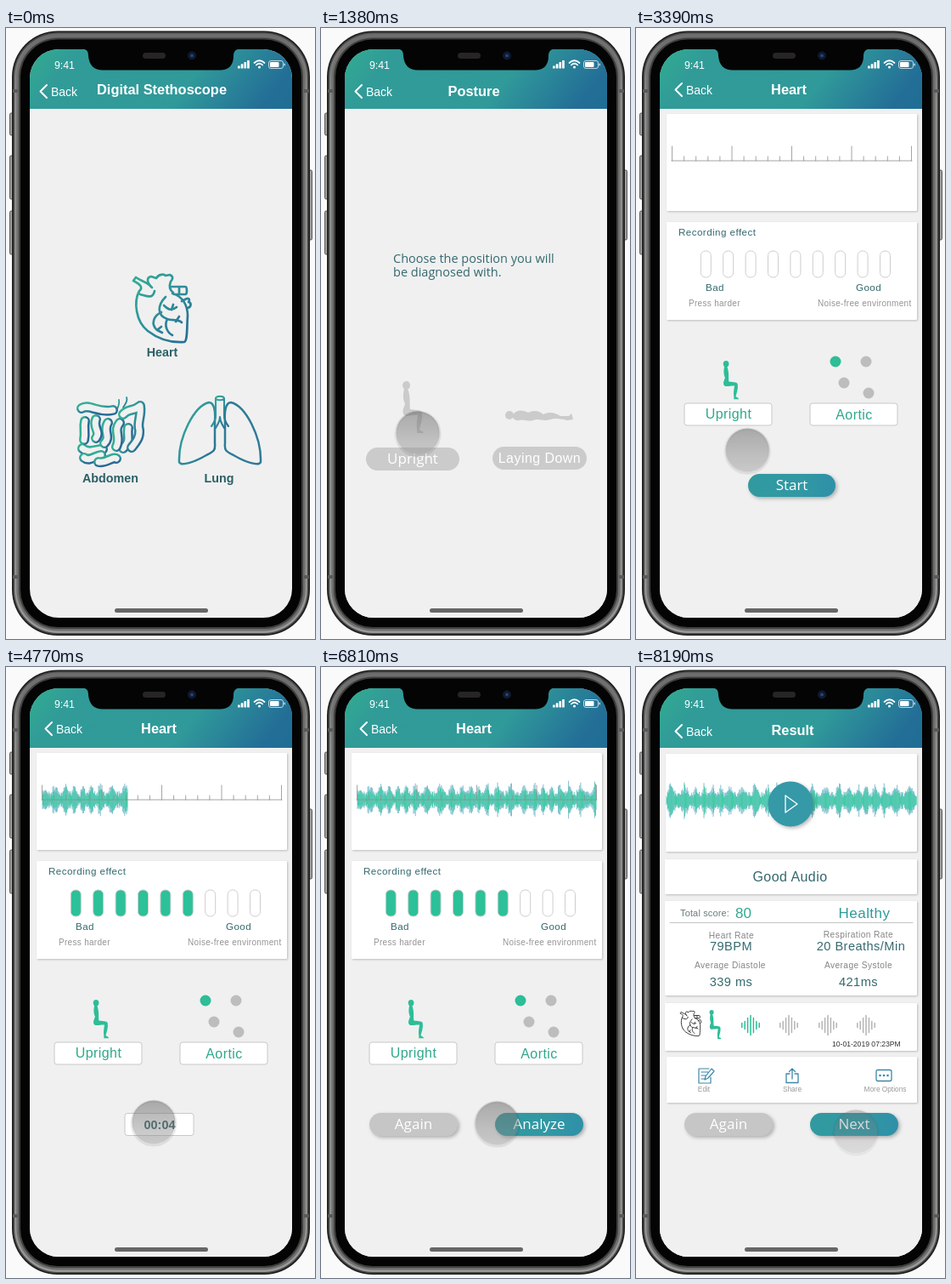
Recreate the animation shown at these times as an HTML page. Size 364 by 718 pixels, loop 8.22 s.

```html
<!DOCTYPE html>
<html lang="en">
<head>
<meta charset="utf-8">
<title>Stethoscope app walkthrough</title>
<style>
html, body { margin: 0; width: 100%; height: 100%; overflow: hidden; background: #fafafa; }
svg { display: block; }
text { font-family: "Open Sans", "Noto Sans", sans-serif; }
.ui { font-family: "Liberation Sans", Arial, sans-serif; }
.line { fill: none; stroke-linecap: round; stroke-linejoin: round; }
.soft { filter: drop-shadow(2px 2px 2px rgba(0, 0, 0, .28)); }
.card { filter: drop-shadow(1px 1px 1px rgba(0, 0, 0, .22)); }
.anim { animation: 8220ms linear infinite; }
.posture { animation-name: posture; }
.position { animation-name: position; }
.record { animation-name: record; }
.result { animation-name: result; }
.pickUpright { animation-name: pickUpright; }
.pickAortic { animation-name: pickAortic; }
.start { animation-name: start; }
.timer { animation-name: timer; }
.done { animation-name: done; }
.tick { animation-name: tick; }
.wipe, .level { transform-box: fill-box; transform-origin: 100% 0; }
.wipe { animation-name: wipe; }
.level { animation-name: level; animation-timing-function: step-end; }
.move { animation-name: move; }
.show { animation-name: show; }

@keyframes posture { 0%, 10.2% { opacity: 0 } 12.8%, 100% { opacity: 1 } }
@keyframes position { 0%, 22.5% { opacity: 0 } 25.2%, 100% { opacity: 1 } }
@keyframes record { 0%, 35.7% { opacity: 0 } 38.3%, 100% { opacity: 1 } }
@keyframes result { 0%, 90.4% { opacity: 0 } 94%, 100% { opacity: 1 } }
@keyframes pickUpright { 0%, 19.2% { opacity: 0 } 20.44%, 100% { opacity: 1 } }
@keyframes pickAortic { 0%, 32.6% { opacity: 0 } 33.2%, 100% { opacity: 1 } }
@keyframes start { 0%, 46.3% { opacity: 1 } 47.4%, 100% { opacity: 0 } }
@keyframes timer { 0%, 46.3% { opacity: 0 } 47.4%, 77.4% { opacity: 1 } 78.8%, 100% { opacity: 0 } }
@keyframes done { 0%, 77.4% { opacity: 0 } 78.8%, 100% { opacity: 1 } }
@keyframes tick {
  0% { transform: none }
  47.45% { transform: none; animation-timing-function: steps(12) }
  77%, 100% { transform: translateY(-324px) }
}
@keyframes wipe { 0%, 47.45% { transform: none } 77%, 100% { transform: scaleX(0) } }
@keyframes level {
  0% { transform: none }
  47.5% { transform: scaleX(.8889) }
  48.6% { transform: scaleX(.6667) }
  49.8% { transform: scaleX(.4444) }
  52% { transform: scaleX(.2222) }
  54.5% { transform: scaleX(.4444) }
  57% { transform: scaleX(.3333) }
  60% { transform: scaleX(.5556) }
  63% { transform: scaleX(.2222) }
  66% { transform: scaleX(.4444) }
  69% { transform: scaleX(.1111) }
  72% { transform: scaleX(.4444) }
  75%, 100% { transform: scaleX(.3333) }
}
@keyframes move {
  0% { transform: translate(300px, 508px) }
  1.82% { transform: translate(300px, 508px); animation-timing-function: ease-in-out }
  7.66% { transform: translate(193px, 355px) }
  14.6% { transform: translate(193px, 355px); animation-timing-function: cubic-bezier(.215, .61, .355, 1) }
  18.98% { transform: translate(103px, 493px) }
  25.5% { transform: translate(103px, 493px); animation-timing-function: ease-in }
  27.37% { transform: translate(116px, 459px); animation-timing-function: ease-out }
  31.8%, 38.9% { transform: translate(118px, 437px); animation-timing-function: ease-in }
  41.24% { transform: translate(131px, 496px); animation-timing-function: ease-out }
  44.89% { transform: translate(174px, 535px) }
  80.29% { transform: translate(174px, 535px); animation-timing-function: ease-in-out }
  86.13%, 93% { transform: translate(258px, 538px); animation-timing-function: ease-in-out }
  98%, 100% { transform: translate(259px, 546px) }
}
@keyframes show { 0%, 1.82% { opacity: 0 } 4%, 95% { opacity: 1 } 99.6%, 100% { opacity: .55 } }
</style>
</head>
<body>
<svg id="stage" width="364" height="718" viewBox="0 0 364 718"></svg>
<script>
const INK = '#34696f', TEAL = '#2f9a9b', GREEN = '#2fa88c', GRAY = '#cbcbcb', PAPER = '#f0f0f0';
const BOLD = 'class="ui" font-weight="700"', WIDE = 'class="ui" letter-spacing=".45"';

const text = (x, y, s, size, fill = INK, extra = '') =>
  `<text x="${x}" y="${y}" font-size="${size}" fill="${fill}" ${extra}>${s}</text>`;
const mid = (x, y, s, size, fill, extra = '') =>
  text(x, y, s, size, fill, 'text-anchor="middle" ' + extra);
const rect = (x, y, w, h, r, fill, extra = '') =>
  `<rect x="${x}" y="${y}" width="${w}" height="${h}" rx="${r}" fill="${fill}" ${extra}/>`;
const dot = (x, y, r, fill) => `<circle cx="${x}" cy="${y}" r="${r}" fill="${fill}"/>`;
const dots = (list, r, fill) => list.map(([x, y]) => dot(x, y, r, fill)).join('');
const line = (d, stroke, w = 1) =>
  `<path class="line" d="${d}" stroke="${stroke}" stroke-width="${w}"/>`;
const card = (x, y, w, h) => rect(x, y, w, h, 1, '#fff', 'class="card"');
const tag = (x, y, s, fill = GRAY, w = 104) =>
  rect(x, y, w, 27, 13.5, fill) + mid(x + w / 2, y + 18.5, s, 16, '#fff', WIDE);
const button = (x, y, s, fill = 'url(#btn)', w = 104, cls = 'soft') =>
  rect(x, y, w, 27, 13.5, fill, `class="${cls}"`) + mid(x + w / 2, y + 18.5, s, 17, '#fff');
const anim = (name, body) => `<g class="anim ${name}">${body}</g>`;
const repeat = (n, f) => Array.from({ length: n }, (_, i) => f(i)).join('');

function screen(title, tx, ty, bx, by, body) {
  return rect(28, 25, 309, 668, 0, PAPER) + body +
    rect(28, 25, 309, 70, 0, 'url(#head)') +
    line(`M${bx - 5} ${by - 13}l-7.5 7.5l7.5 7.5`, '#fff', 2) +
    text(bx, by, 'Back', 14, '#fff', 'class="ui"') +
    mid(tx, ty, title, 16.4, '#fff', BOLD);
}

function wave(x0, x1, cy, seed) {
  const rnd = () => (seed = seed * 16807 % 2147483647) / 2147483647;
  let blue = '', green = '';
  for (let x = x0; x <= x1; x += 1.1) {
    const beat = Math.abs(Math.sin(x * .26 + Math.sin(x * .07))) ** 4;
    const a = 4 + 6 * rnd() + beat * (7 + 6 * rnd());
    const b = a * (.5 + .4 * rnd());
    blue += `M${x.toFixed(1)} ${(cy - a).toFixed(1)}v${(a * 2).toFixed(1)}`;
    green += `M${(x + .5).toFixed(1)} ${(cy - b).toFixed(1)}v${(b * 2).toFixed(1)}`;
  }
  return `<g opacity=".9">${line(blue, '#4aa6bb', .8)}${line(green, '#2dc59c', 1)}</g>`;
}

const HEART = 'M157 309C150 322 153 345 167 356C180 366 196 370 210 369C214 368 213 350 214 338' +
  'C214 326 208 315 196 312M157 309C162 305 158 301 150 297L153 293C160 298 166 298 171 304' +
  'M158 313C166 315 173 319 175 309M172 305C166 300 165 293 171 292L177 294C180 289 186 289 188 291' +
  'L193 290C198 292 196 296 194 298C192 303 193 308 197 311M195 304H211Q213 304 213 308.500T211 313H198' +
  'M204 304v9M207 321L213 318C217 317 216 321 215 322C219 323 218 328 214 329' +
  'M188 316C178 326 178 338 190 342C196 344 203 342 207 346M183 334C174 338 170 348 178 355' +
  'M178 355l6 3M178 355l5-4M190 342C186 350 190 358 196 361M186 326C192 332 196 332 201 328' +
  'M195 331l2-6M200 345l4-6';
const HALF_LUNG = 'M239 440C222 444 203 480 204 510C206 516 224 509 236 502C244 498 247 497 246 488' +
  'V462C247 450 245 440 239 440Z';
const TUBES = ['M90 494C98 501 108 494 114 495', 'M92 505C98 510 104 503 112 502',
  'M109 510C118 512 126 503 130 506', 'M144 470C142 480 148 484 138 494',
  'M134 464C126 474 136 480 130 492', 'M120 464C114 474 124 480 116 488',
  'M106 460C102 470 112 474 106 482', 'M93 462C91 470 94 474 92 484',
  'M138 454C144 447 150 451 158 444C160 456 154 464 157 472C158 482 152 488 148 493',
  'M89 447C98 441 108 453 126 449'];

const sitting = (x, y, s, fill) => `<g transform="translate(${x} ${y}) scale(${s})" fill="${fill}">
  <ellipse cx="5.500" cy="5" rx="4.500" ry="5"/>
  <path d="M3 9C1 17 2 22 4 27C2 32 0 36 3 40C8 42 14 39 19 40C18 46 17 52 18 57V61H26C25 58 21 58 21 56C23 50 25 43 24 37C23 33 14 34 10 33C9 27 11 18 7 9Z"/></g>`;
const lying = `<g fill="${GRAY}"><ellipse cx="222" cy="455" rx="5" ry="5"/>
  <path d="M226 454C232 448 238 449 244 452C250 449 256 449 262 454C270 450 277 453 282 456L292 456L295 453L297 460L290 461C282 459 276 458 270 460C262 463 256 458 250 461C244 463 238 459 233 461C229 462 227 459 226 458Z"/></g>`;

const home = screen('Digital Stethoscope', 183.5, 78, 53, 80,
  line(HEART, 'url(#ink)', 2.7) + mid(184, 386, 'Heart', 14.3, '#2b5f66', BOLD) +
  line('M133 437C134 442 132 446 130 450M142 434C144 439 140 442 138 446', 'url(#ink)', 1.8) +
  TUBES.map(d => line(d, 'url(#ink)', 12) + line(d, PAPER, 7)).join('') +
  mid(123, 534, 'Abdomen', 14.3, '#2b5f66', BOLD) +
  line(HALF_LUNG, 'url(#ink)', 2.5) +
  `<g transform="matrix(-1 0 0 1 504 0)">${line(HALF_LUNG, '#2f7a97', 2.5)}</g>` +
  line('M247 435V455C247 461 245 464 242 468M257 435V455C257 461 259 464 262 468M252 457C252 463 249 466 247 470M252 457C252 463 255 466 257 470M247 435C248 432 256 432 257 435C256 438 248 438 247 435', 'url(#ink)', 2.1) +
  mid(251, 534, 'Lung', 14.3, '#2b5f66', BOLD));

const posture = screen('Posture', 180, 80, 53, 80,
  text(85, 276, 'Choose the position you will', 14.5) + text(85, 292, 'be diagnosed with.', 14.5) +
  sitting(95, 415, 1, GRAY) + lying +
  button(53, 493, 'Upright', GRAY, 110, '') + tag(202, 492, 'Laying Down', GRAY, 111) +
  anim('pickUpright', sitting(95, 415, 1, '#2dbd97') + button(53, 493, 'Upright', 'url(#btn)', 110, '')));

const position = screen('Position', 180.5, 80, 53, 80,
  text(123, 276, 'Put Hearkenby to the', 14.5) + text(123, 292, 'position you chose.', 14.5) +
  line('M166 389C170 411 201 411 205 389M170 403C171 414 168 421 160 423M202 403C201 414 204 421 212 423' +
    'M136 433C114 437 111 452 111 472Q111 490 107 505M235 433C258 438 259 452 259 519' +
    'M136 472C142 497 176 496 187 483C198 496 230 492 233 467M137 487C135 510 130 517 122 527' +
    'M137 499C142 515 144 526 145 545M233 473C235 500 231 520 228 545M235 500C235 516 238 528 241 541', '#222', 1) +
  '<g fill="none" stroke="#444" stroke-width=".8"><ellipse cx="155" cy="482" rx="3" ry="1.500"/><ellipse cx="211" cy="481" rx="3" ry="1.500"/></g>' +
  line('M147 437L183 471M241 437L205 471M144 550L189 488M221 550L208 494', '#bdbdbd') +
  dots([[183, 471], [205, 471], [189, 488], [208, 494]], 4, '#acacac') +
  tag(58, 410, 'Aortic') + tag(203, 410, 'Pulmonic') + tag(59, 550, 'Tricuspid') + tag(203, 550, 'Mitral') +
  anim('pickAortic', line('M147 437L183 471', '#7cc7b8') + dot(183, 471, 4, '#2dbd97') + tag(58, 410, 'Aortic', 'url(#btn)')));

const ruler = line(repeat(21, i => `M${42.5 + i * 14.1} 156v${i % 5 ? -5 : -17}`) + 'M42 156H325', '#8f8f8f', .8);
const bars = (fill, stroke) => repeat(9, i =>
  rect(76.3 + i * 26.4, 262, 12, 31, 5.5, fill, `stroke="${stroke}"`));
const box = (x, s, ty) => rect(x, 441, 103, 26, 3, '#fff', 'stroke="#c8c8c8"') +
  mid(x + 52, ty, s, 16, GREEN, WIDE);
const small = (x, y, s) => text(x, y, s, 10, '#949494', 'class="ui" letter-spacing=".3"');
const label = (x, y, s) => text(x, y, s, 11.6, INK, WIDE);

const record = screen('Heart', 180, 78, 59, 78,
  card(36, 101, 295, 114) + wave(43, 324, 156, 77) +
  rect(41, 128, 286, 58, 0, '#fff', 'class="anim wipe"') + ruler +
  card(36, 228, 295, 115) + label(50, 244, 'Recording effect') +
  bars('#2cc198', 'none') + rect(69, 260, 237.6, 35, 0, '#fff', 'class="anim level"') + bars('none', '#cdcdcd') +
  label(82, 309, 'Bad') + label(259, 309, 'Good') +
  small(62, 327, 'Press harder') + small(214, 327, 'Noise-free environment') +
  sitting(102, 391, .74, '#2dbd97') +
  dot(235, 392, 6.5, '#2dbd97') + dots([[271, 392], [245, 417], [274, 429]], 6.5, '#bdbdbd') +
  box(57, 'Upright', 459) + box(205, 'Aortic', 460) +
  anim('start', button(132, 524, 'Start', 'url(#btn)', 103)) +
  anim('timer', rect(140, 524.5, 81, 26, 3, '#fff', 'stroke="#c8c8c8"') +
    `<svg x="140" y="524" width="81" height="27">${anim('tick', repeat(13, i =>
      mid(41, 19 + i * 27, '00:' + String(i).padStart(2, '0'), 14.4, '#2d5a60', BOLD)))}</svg>`) +
  anim('done', button(57, 524, 'Again', '#c6c6c6') + button(205, 524, 'Analyze')));

const pulse = (cx, color) => line([5, 9, 17, 23, 17, 9, 5].map((h, i) =>
  `M${cx + (i - 3) * 3.4} ${421 - h / 2}v${h}`).join(''), color, 1.5);
const value = (x, y, s) => mid(x, y, s, 14.6, INK, WIDE);
const caption = (x, y, s) => mid(x, y, s, 10.2, '#858585', 'class="ui" letter-spacing=".4"');
const hint = (x, s) => mid(x, 499, s, 8.3, '#999', 'class="ui"');
const BLUE = '#3c87a8';

const result = screen('Result', 184.5, 80, 59, 81,
  card(35, 102, 296, 115) + wave(36, 330, 157, 4242) +
  `<circle class="soft" cx="182" cy="161" r="26.500" fill="#3599a7"/>` + line('M176 151V171L190 161Z', '#fff', 1.3) +
  card(34, 226, 297, 41) + mid(181.5, 252, 'Good Audio', 16, INK, WIDE) +
  card(34, 275, 297, 111) + text(52, 293, 'Total score:', 11, '#6c7c7e', 'class="ui" letter-spacing=".15"') +
  text(117, 295, '80', 17, GREEN, 'class="ui"') + mid(269, 295, 'Healthy', 17, TEAL, WIDE) +
  line('M40 300.500H326', '#c4c4c4') +
  caption(112.5, 319, 'Heart Rate') + value(112, 333, '79BPM') +
  caption(262, 318, 'Respiration Rate') + value(265, 333, '20 Breaths/Min') +
  caption(111, 354, 'Average Diastole') + value(112, 375, '339 ms') +
  caption(262, 354, 'Average Systole') + value(262, 375, '421ms') +
  card(34, 395, 297, 56) +
  `<g transform="translate(-3.500 297) scale(.37)">${line(HEART, '#333', 2.6)}</g>` +
  sitting(86, 403, .56, '#2dbd97') + pulse(135, '#2dbd97') + [180, 226, 271].map(x => pulse(x, '#b4b4b4')).join('') +
  text(231, 446, '10-01-2019 07:23PM', 8.6, '#333', 'class="ui"') +
  card(36, 458, 295, 54) +
  line('M86 472H74V489H88V482M77 476h8M77 480h5M77 484h4M81 485l1-4L89 472l3 3L85 483Z', BLUE, 1.2) +
  line('M181 478H177V488.500H191V478H187M184 484V472M180.500 475.500L184 472L187.500 475.500', BLUE, 1.3) +
  rect(283, 473.5, 18, 13, 2, 'none', `stroke="${BLUE}" stroke-width="1.300"`) +
  dots([[287.5, 480], [292, 480], [296.5, 480]], 1.3, BLUE) +
  hint(80, 'Edit') + hint(184, 'Share') + hint(293.5, 'More Options') +
  button(57, 524, 'Again', '#c6c6c6') + button(205, 524, 'Next'));

const status = text(57, 48, '9:41', 12.3, '#fff', 'class="ui"') +
  repeat(4, i => rect(273 + i * 3.7, 44.5 - i * 2.2, 2.7, 3 + i * 2.2, .6, '#fff')) +
  line('M292.500 41Q298.500 35.500 304.500 41M294.800 43.500Q298.500 40 302.200 43.500', '#fff', 1.7) + dot(298.5, 46, 1.5, '#fff') +
  rect(309.5, 38.5, 17, 9, 2.5, 'none', 'stroke="#fff" stroke-opacity=".7"') + rect(311, 40, 10.5, 6, 1, '#fff') +
  rect(327.5, 41.5, 1.5, 3, .7, '#fff', 'opacity=".7"');

// Nested shells from the outer rim to the black bezel
const shell = (inset, fill) =>
  rect(7 + inset, 3.5 + inset, 351 - 2 * inset, 710.5 - 2 * inset, 54 - inset, fill);
const phone = [[4, 100, 26], [4, 150, 51], [4, 215, 51], [356, 167, 82]].map(([x, y, h]) =>
    rect(x + .5, y, 4, h, 1.5, '#a2a2a2', 'stroke="#3a3a3a" stroke-width=".8"')).join('') +
  shell(0, '#1c1c1c') + shell(1.5, '#484848') + shell(3, 'url(#metal)') +
  shell(5.5, '#6e6e6c') + shell(8, '#3f3f3e') + shell(10, '#040404') +
  [[8, 72], [351, 72], [8, 643], [351, 643]].map(([x, y]) => rect(x, y, 6, 4, 0, '#5a5a5a')).join('');

const notch = '<path d="M89 24C96 25 97 28 97 33C98 44 104 49.500 114 49.500H252C262 49.500 268 44 268 33C268 28 270 25 276 24Z" fill="#040404"/>' +
  rect(161, 29, 27, 7, 3.5, '#272525') + dot(219, 32.5, 5, '#10192e') + dot(219, 32.5, 2, '#24447a');

const stop = (o, c, a = 1) => `<stop offset="${o}" stop-color="${c}" stop-opacity="${a}"/>`;
const defs = `<defs>
  <linearGradient id="head" gradientUnits="userSpaceOnUse" x1="28" y1="25" x2="255" y2="200">${stop(0, '#31ad90')}${stop(.16, '#319b98')}${stop(.6, '#309a9a')}${stop(.9, '#236e97')}${stop(1, '#1f6e94')}</linearGradient>
  <linearGradient id="ink" x2="1" y2="1">${stop(0, '#32ae94')}${stop(.45, '#2f929a')}${stop(1, '#286a94')}</linearGradient>
  <linearGradient id="btn">${stop(0, '#319a9f')}${stop(.6, '#3198a4')}${stop(1, '#2f90a8')}</linearGradient>
  <linearGradient id="metal" x2="0" y2="1">${stop(0, '#6c6c6c')}${stop(.12, '#8d8d8b')}${stop(.88, '#8d8d8b')}${stop(1, '#9a9a9a')}</linearGradient>
  <linearGradient id="touch" x2="0" y2="1">${stop(0, '#6c6c6c', .54)}${stop(1, '#909090', .4)}</linearGradient>
  <clipPath id="glass"><rect x="28" y="25" width="309" height="668" rx="34"/></clipPath></defs>`;

const cursor = anim('move', anim('show',
  '<circle r="26" cy="1" fill="none" stroke="#000" stroke-opacity=".08" stroke-width="3"/><circle r="25.500" fill="url(#touch)"/>'));

document.getElementById('stage').innerHTML = defs + phone + `<g clip-path="url(#glass)">` + home +
  anim('posture', posture) + anim('position', position) + anim('record', record) + anim('result', result) +
  status + rect(128, 682, 110, 5, 2.5, '#666') + '</g>' + notch + cursor;
</script>
</body>
</html>
```
